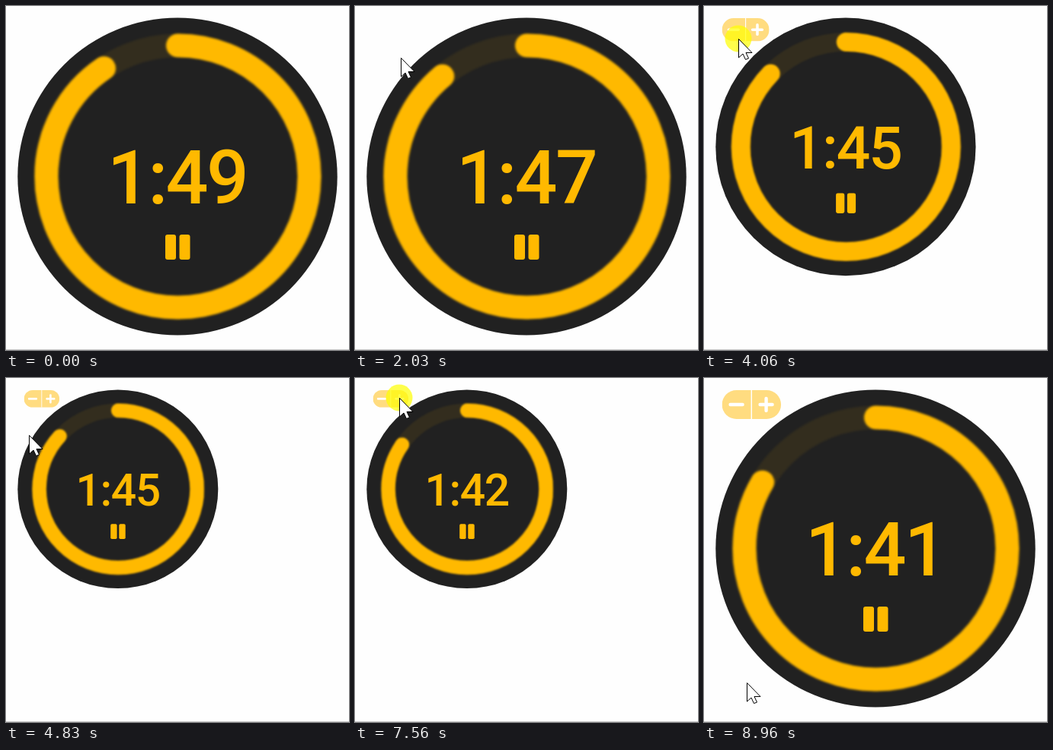
Recreate the animation shown at these times as an HTML page. Size 450 px wide and 453 px high, loop 9030 ms.

```html
<!DOCTYPE html>
<html lang="en">
<head>
<meta charset="utf-8">
<title>Countdown</title>
<style>
  html, body { margin: 0; width: 100%; height: 100%; overflow: hidden; background: #fefefe; }
  svg { display: block; }
  #time { font: 500 98px Roboto, Arial, sans-serif; letter-spacing: -0.025em; }
  .ring { fill: none; stroke: #ffb900; stroke-width: 31; filter: url(#soft); }
</style>
</head>
<body>
<svg width="450" height="453" viewBox="0 0 450 453">
  <defs>
    <filter id="soft"><feGaussianBlur stdDeviation="1.6"/></filter>
    <clipPath id="pill"><rect width="77.5" height="38" rx="19"/></clipPath>
  </defs>
  <rect y="452" width="450" height="1" fill="#c8c8c8"/>
  <ellipse id="face" fill="#212121"/>
  <g id="dial" fill="#ffb900">
    <circle class="ring" cx=".5" r="172.5" opacity=".08"/>
    <circle id="arc" class="ring" cx=".5" r="172.5" pathLength="120" stroke-linecap="round" transform="rotate(-90 .5 0)"/>
    <text id="time" x="-92" y="35.5"></text>
    <rect x="-16" y="76.5" width="14" height="33" rx="3"/>
    <rect x="2.5" y="76.5" width="14" height="33" rx="3"/>
  </g>
  <g id="buttons">
    <g clip-path="url(#pill)">
      <rect width="77.5" height="38" fill="#ffdc80"/>
      <rect x="38" width="1.4" height="38" fill="#fff"/>
    </g>
    <path d="M11 19h16M50 19h16M58 11v16" stroke="#fff" stroke-width="4.4" stroke-linecap="round"/>
  </g>
  <circle id="press" r="17.5" fill="#ff0" opacity=".7"/>
  <path id="cursor" d="M0 0V24.5L5.5 19.5L9 27L13 25.5L9.5 18H17.5Z" fill="#fff" stroke="#000"/>
</svg>
<script>
const LOOP = 9030, STEP = 70;
const el = id => document.getElementById(id);
const [face, dial, arc, time, buttons, press, cursor] =
  ["face", "dial", "arc", "time", "buttons", "press", "cursor"].map(el);

// Pointer stops: ms, x, y
const stops = [
  [1400, 10, 112], [2030, 60, 68], [2660, 45, 43], [4270, 45, 43],
  [4830, 30, 75], [5250, 0, 92], [5600, 0, 92], [6510, 75, 42],
  [7210, 58, 26], [7840, 58, 26], [8190, 73, 31], [8470, 73, 31], [8960, 56, 401]
];
// Each press changes the size when it is released: start, end, new scale
const clicks = [[3150, 3430, .8], [3920, 4200, .6], [7490, 7770, .8], [8260, 8470, 1]];
const shown = [[2310, 5530], [6930, LOOP]];

const within = (t, [a, b]) => t >= a && t < b;
const show = (node, on) => node.setAttribute("visibility", on ? "visible" : "hidden");
const place = (node, x, y, s = 1) => node.setAttribute("transform", `translate(${x} ${y}) scale(${s})`);

function pointerAt(t) {
  const i = stops.findIndex(p => p[0] > t);
  if (i < 1) return stops.at(i).slice(1);
  const [t0, x0, y0] = stops[i - 1], [t1, x1, y1] = stops[i];
  const u = (t - t0) / (t1 - t0), k = u * u * (3 - 2 * u);
  return [x0 + (x1 - x0) * k, y0 + (y1 - y0) * k];
}

function draw(t) {
  const scale = clicks.reduce((s, c) => t >= c[1] ? c[2] : s, 1);
  const r = 14.5 + 195.5 * scale, cx = 15 + r, cy = cx - .5;
  const attrs = { cx, cy, rx: r - .3, ry: r - 1 };
  for (const k in attrs) face.setAttribute(k, attrs[k]);
  place(dial, cx, cy, scale);

  const left = 108.6 - .945 * t / 1000, sec = Math.ceil(left);
  arc.setAttribute("stroke-dasharray", `${left} 120`);
  time.textContent = `${Math.floor(sec / 60)}:${String(sec % 60).padStart(2, "0")}`;

  place(buttons, 23.6, 16, scale);
  show(buttons, shown.some(s => within(t, s)));
  const [x, y] = pointerAt(t);
  place(press, x, y);
  show(press, clicks.some(c => within(t, c)));
  place(cursor, x + .5, y + .5);
  show(cursor, t >= stops[0][0]);
}

const start = performance.now();
function tick() {
  const t = (performance.now() - start) % LOOP;
  draw(Math.floor(t / STEP) * STEP);
  requestAnimationFrame(tick);
}
tick();
</script>
</body>
</html>
```
